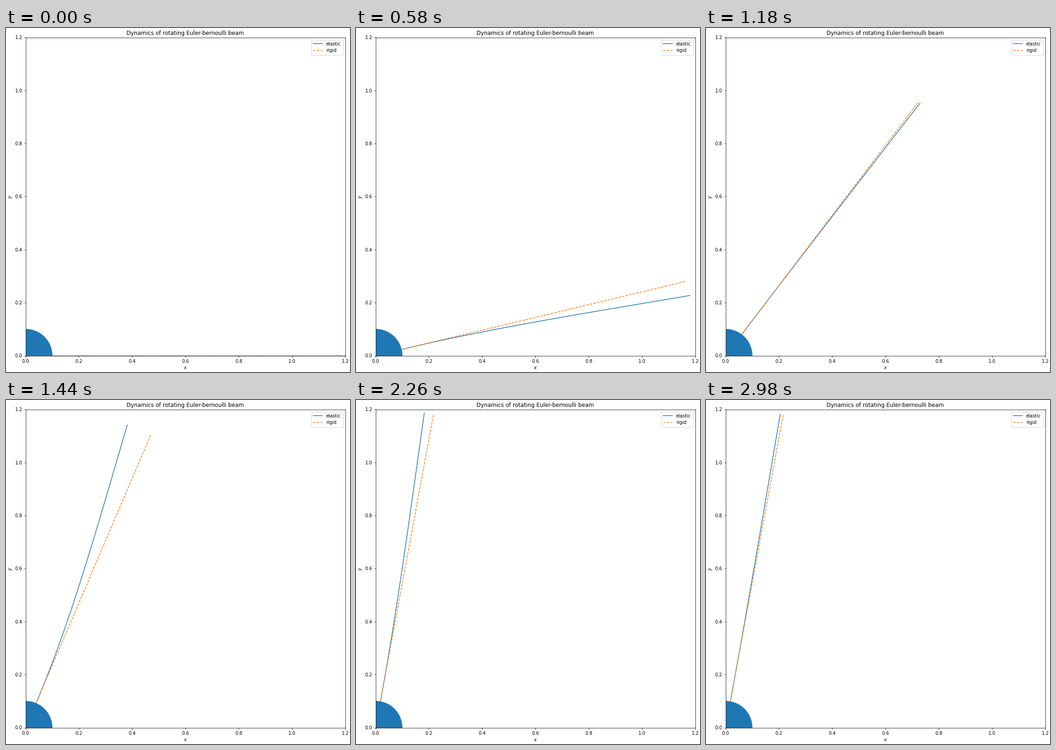
These frames come from a looping animation (748 px wide and 748 px high, 3000 ms). A matplotlib script:

```python
import numpy as np
import matplotlib.pyplot as plt
from matplotlib.animation import FuncAnimation

SIZE, DPI = 748, 72
FRAMES, STEP_MS = 150, 20
HUB, LENGTH = 0.1, 1.1
ACCEL = 1.39        # bang-bang angular acceleration, rad/s^2
OMEGA = 7.30        # first bending frequency, rad/s
SAG = 0.0379        # quasi-static tip deflection
COUPLING = 0.04     # reaction of the bending on the hub angle
SWITCHES = ((0, 1), (1, -2), (2, 1))    # time and size of torque steps

plt.rcParams["font.family"] = "DejaVu Sans"

s = np.linspace(0, 1, 101)


def cantilever(s, beta=1.8751, sigma=0.7341):
    """First clamped-free mode, scaled to 1 at the tip."""
    def phi(u):
        return (np.cosh(u) - np.cos(u)) - sigma * (np.sinh(u) - np.sin(u))
    return phi(beta * s) / phi(beta)


mode = cantilever(s)
radius = HUB + LENGTH * s


def state(t):
    """Hub angle and tip lag at time t."""
    angle = lag = 0.0
    for start, gain in SWITCHES:
        dt = max(t - start, 0)
        angle += gain * ACCEL * dt**2 / 2
        lag += gain * SAG * (1 - np.cos(OMEGA * dt))
    return angle + COUPLING * lag, lag


def rotate(x, y, angle):
    c, sn = np.cos(angle), np.sin(angle)
    return x * c - y * sn, x * sn + y * c


fig = plt.figure(figsize=(SIZE / DPI, SIZE / DPI), dpi=DPI)
left, right, top, bottom = 42.5, 737.5, 20.5, 712.5
ax = fig.add_axes([left / SIZE, 1 - bottom / SIZE,
                   (right - left) / SIZE, (bottom - top) / SIZE])
ax.set(xlim=(0, 1.2), ylim=(0, 1.2), xlabel="$x$", ylabel="$y$",
       title="Dynamics of rotating Euler-bernoulli beam")
ax.add_patch(plt.Circle((0, 0), HUB, color="C0"))
elastic, = ax.plot([], [], "C0-", lw=1.5, label="elastic")
rigid, = ax.plot([], [], "C1--", lw=1.5, label="rigid")
ax.legend(loc="upper right")


def update(i):
    angle, lag = state(i * STEP_MS / 1000)
    elastic.set_data(*rotate(radius, -lag * mode, angle))
    rigid.set_data(*rotate(radius, 0 * radius, angle))
    return elastic, rigid


anim = FuncAnimation(fig, update, frames=FRAMES, interval=STEP_MS,
                     repeat=True, repeat_delay=0)
plt.show()
```
